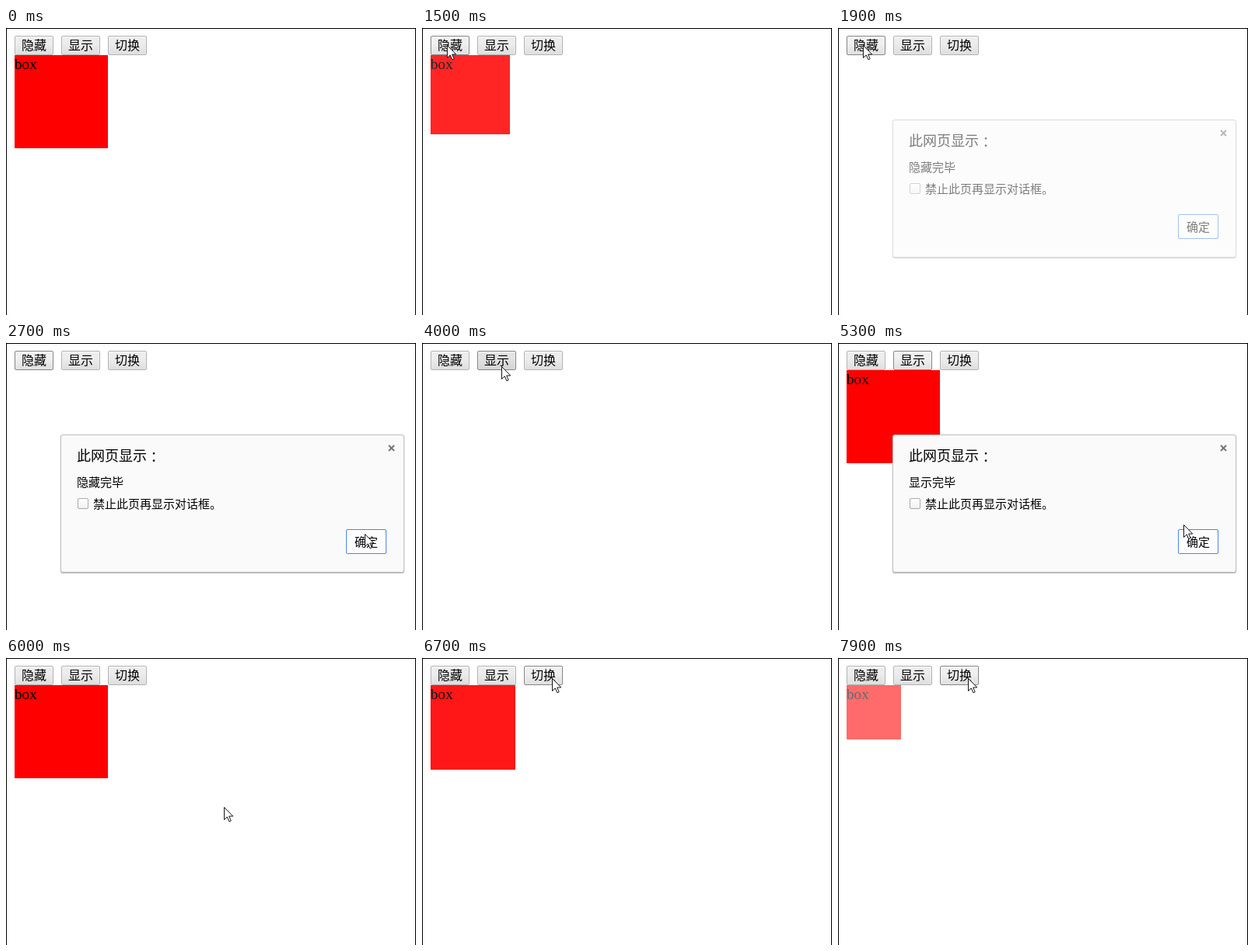
Write an HTML page that moves like this. It is 527 by 370 pixels and loops after 8000 ms.

```html
<!DOCTYPE html>
<html lang="zh-CN">
<head>
<meta charset="utf-8">
<style>
html, body { margin: 0; width: 100%; height: 100%; overflow: hidden; background: #fff; }
#stage { position: relative; width: 527px; height: 370px; overflow: hidden; color: #000;
  font-family: "Noto Sans CJK SC", "Noto Sans CJK", sans-serif; }
#stage * { position: absolute; box-sizing: border-box; white-space: nowrap; }
#page { inset: 0; border: 1px solid #000; border-bottom: 0; }
.btn { top: 10px; width: 50px; height: 25px; border: 1px solid #b2b2b2; border-radius: 2px;
  background: linear-gradient(#ededed 38%, #dedede); font-size: 16px; line-height: 21px;
  text-align: center; box-shadow: inset 0 1px 2px rgba(255,255,255,.75); }
.btn.hover { border-color: #858585; background: linear-gradient(#f0f0f0 38%, #e0e0e0); }
.btn.down { background: linear-gradient(#e2e2e2 38%, #d4d4d4); }
#box { left: 11px; top: 35px; overflow: hidden; background: #f00;
  font: 19.2px/24px "Liberation Serif", serif; }
#dialog { left: 70px; top: 118px; width: 442px; height: 178px; background: #fafafa;
  border: 1px solid #bcbcbc; border-radius: 3px; box-shadow: 0 1px 1px rgba(0,0,0,.3); font-size: 15px; }
#dialog div { line-height: 20px; }
#dialog .title { left: 20px; top: 15px; font-size: 18px; }
#dialog .title i { position: relative; top: 2px; font-style: normal; font-family: "Noto Sans CJK JP", sans-serif; }
#message { left: 20px; top: 50px; }
#check { left: 21px; top: 81px; width: 14px; height: 14px; border: 1px solid #aaa;
  border-radius: 2px; background: linear-gradient(#fff, #f0f0f0); }
#dialog .label { left: 41px; top: 78px; }
#dialog #ok { left: 366px; top: 121px; width: 52px; height: 32px; border: 1px solid #4a86e8;
  border-radius: 2px; background: #fcfcfc; line-height: 29px; text-align: center; }
#dialog #ok.down { background: #e8e8e8; }
#dialog svg { left: 420px; top: 12px; }
#cursor { left: 0; top: 0; }
</style>
</head>
<body>
<div id="stage">
  <div id="page"></div>
  <div class="btn" style="left:11px">隐藏</div>
  <div class="btn" style="left:71px">显示</div>
  <div class="btn" style="left:131px">切换</div>
  <div id="box">box</div>
  <div id="dialog">
    <div class="title">此网页显示<i lang="ja">：</i></div>
    <svg width="9" height="9"><path d="M1 1 8 8M8 1 1 8" stroke="#707070" stroke-width="1.8"/></svg>
    <div id="message"></div>
    <div id="check"></div>
    <div class="label">禁止此页再显示对话框。</div>
    <div id="ok">确定</div>
  </div>
  <svg id="cursor" width="13" height="20">
    <path d="M.5.5V16.5L4.3 12.9 6.9 18.8 9.2 17.8 6.7 12H11.8Z" fill="#fff" stroke="#15151f"/>
  </svg>
</div>
<script>
const LOOP = 8000, STEP = 100, FULL = 120, FADE = 500, PRESS = 150;
const $ = id => document.getElementById(id);
const buttons = [...document.querySelectorAll('.btn')];

const entry = { start: 100, x: 432, y: 42 };
// each move eases out to x, y; bend bows its path downwards
const moves = [
  { start: 100, time: 1500, x: 32, y: 22, bend: 13 },
  { start: 2100, time: 600, x: 461, y: 246, bend: 31 },
  { start: 3200, time: 600, x: 102, y: 30, bend: 100 },
  { start: 4800, time: 500, x: 444, y: 234, bend: 55 },
  { start: 5300, time: 200, x: 443, y: 254, bend: 0 },
  { start: 5900, time: 500, x: 167, y: 26, bend: 75 }
];
// a dialog with the message follows the fade and stays until "close"
const clicks = [
  { button: 0, start: 1374, show: false, message: '隐藏完毕', close: 3100 },
  { button: 1, start: 4100, show: true, message: '显示完毕', close: 5700 },
  { button: 2, start: 6602, show: false },
  { button: 2, start: 7624, show: true }
];

const clamp = v => Math.min(1, Math.max(0, v));
const swing = p => 0.5 - Math.cos(Math.PI * p) / 2;
const easeOut = p => 1 - (1 - p) ** 4;
const within = (t, from, to) => t >= from && t < to;

function pointerAt(t) {
  let { x, y } = entry;
  for (const m of moves.filter(m => m.start <= t)) {
    const e = easeOut(clamp((t - m.start) / m.time));
    x += (m.x - x) * e;
    y += (m.y - y) * e + 4 * m.bend * e * (1 - e);
  }
  return [Math.round(x), Math.round(y)];
}

function boxShown(t) {
  const last = clicks.filter(c => c.start <= t).pop();
  if (!last) return 1;
  const p = swing(clamp((t - last.start) / FADE));
  return last.show ? p : 1 - p;
}

function draw(t) {
  const shown = boxShown(t), box = $('box').style;
  box.display = shown > 0 ? '' : 'none';
  box.width = box.height = Math.round(FULL * shown) + 'px';
  box.opacity = shown;

  const open = clicks.find(c => c.message && within(t, c.start + FADE, c.close + STEP));
  $('dialog').style.display = open ? '' : 'none';
  if (open) {
    const opened = open.start + FADE;
    $('message').textContent = open.message;
    $('dialog').style.opacity = t >= open.close ? 0.5 : clamp((t - opened + STEP) / 250);
    $('ok').classList.toggle('down', within(t, open.close - PRESS, open.close));
  }

  const [x, y] = pointerAt(t);
  $('cursor').style.display = t >= entry.start ? '' : 'none';
  $('cursor').style.transform = `translate(${x}px, ${y}px)`;

  // a button keeps its hover look while its dialog blocks the page
  buttons.forEach((button, i) => {
    const left = button.offsetLeft;
    const over = within(x, left, left + 50) && within(y, 10, 35);
    button.classList.toggle('hover', open ? open.button === i : over);
    button.classList.toggle('down',
      clicks.some(c => c.button === i && within(t, c.start - PRESS, c.start)));
  });
}

const begin = performance.now();
function tick() {
  const t = (performance.now() - begin) % LOOP;
  draw(Math.floor(t / STEP) * STEP);
  requestAnimationFrame(tick);
}
tick();
</script>
</body>
</html>
```
